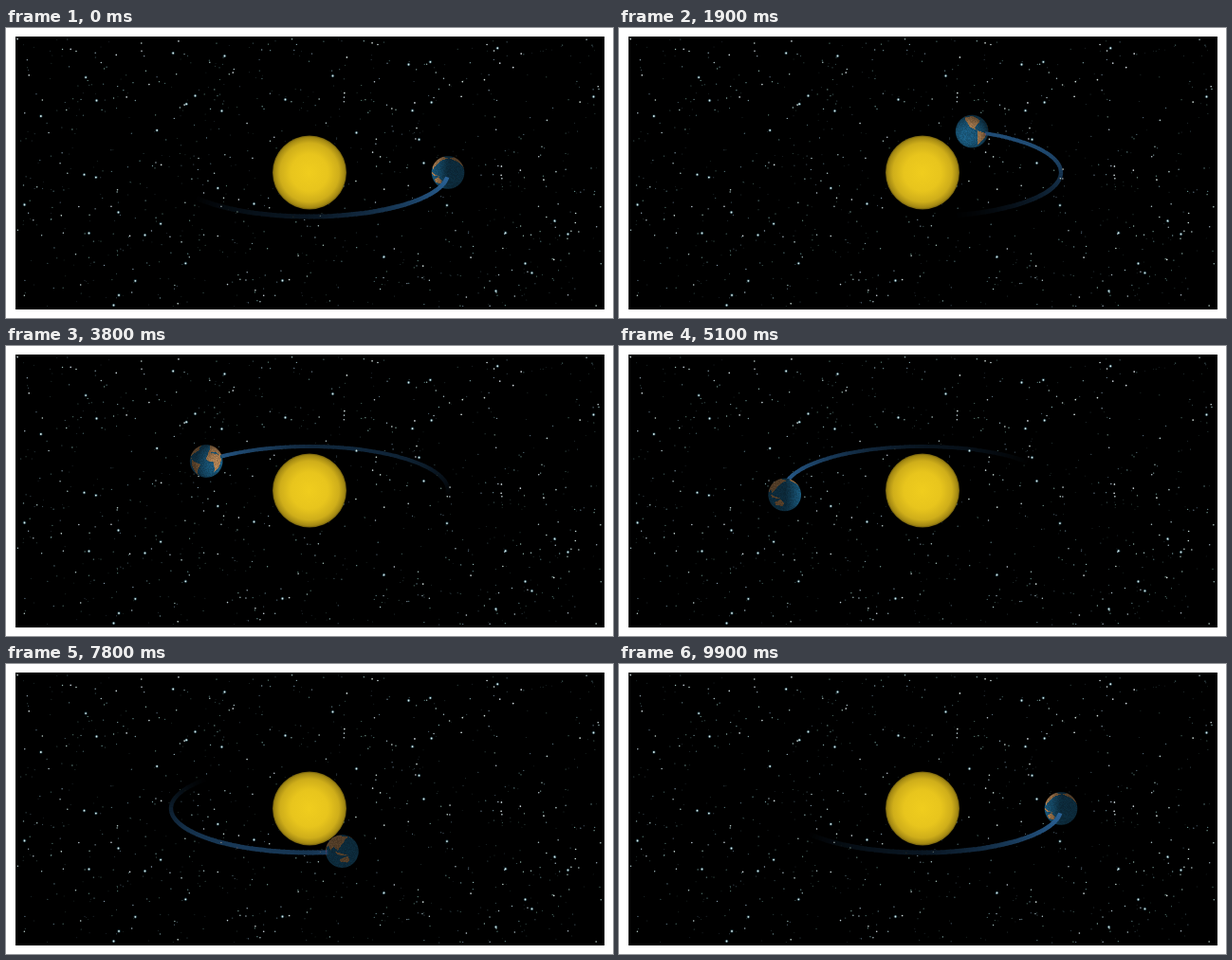
Animation of 640 by 306 pixels, one loop 10 s. Source, as an HTML page with a canvas:

```html
<!DOCTYPE html>
<html lang="en">
<head>
<meta charset="utf-8">
<title>Planet orbiting a star</title>
<style>
html, body { margin: 0; width: 640px; height: 306px; overflow: hidden; background: #fff; }
canvas { display: block; }
</style>
</head>
<body>
<canvas id="stage" width="640" height="306"></canvas>
<script>
const TAU = Math.PI * 2, RAD = Math.PI / 180;
const CX = 320, CY = 152.5, RX = 146, RY = 46.5;
const SUN_R = 39, EARTH_R = 17.3, SIZE = 40;
const STEPS = 99, SPINS = 4, START_LON = 177;
const TILT = Math.asin(RY / RX), VIEW_LAT = 6 * RAD;
const ctx = document.getElementById('stage').getContext('2d');

function layer(w, h) {
  const canvas = document.createElement('canvas');
  canvas.width = w;
  canvas.height = h;
  return canvas.getContext('2d', { willReadFrequently: true });
}

function seeded(seed) {
  return () => (seed = (seed * 16807) % 2147483647) / 2147483647;
}

// The brightest stars; the rest are scattered by a seeded rule
const brightStars = [
  199,71, 369,110, 424,38, 118,194, 227,87, 87,216, 440,142, 547,248,
  516,277, 398,241, 291,266, 113,292, 19,186, 230,29, 619,72, 578,203,
  592,217, 344,50, 95,76, 261,185, 294,75, 146,218
];

function makeSky() {
  const sky = layer(640, 306), rnd = seeded(4217);
  const dot = (x, y, r, color) => {
    sky.fillStyle = color;
    sky.beginPath();
    sky.arc(x, y, r, 0, TAU);
    sky.fill();
  };
  const bright = (x, y) => {
    dot(x, y, 1.8, 'rgba(70,130,150,.4)');
    dot(x, y, 0.9, '#dff4f4');
  };
  sky.fillStyle = '#fff';
  sky.fillRect(0, 0, 640, 306);
  sky.fillStyle = '#000';
  sky.fillRect(10, 9, 621, 288);
  for (let i = 0; i < 950; i++) {
    const x = 12 + rnd() * 616, y = 11 + rnd() * 283, glow = rnd() ** 2.2;
    const hue = 160 + rnd() * 50;
    dot(x, y, 0.45 + glow * 0.4, `hsl(${hue} 18% ${22 + glow * 65}%)`);
  }
  for (let i = 0; i < brightStars.length; i += 2) {
    bright(brightStars[i] + 0.5, brightStars[i + 1] + 0.5);
  }
  for (let i = 0; i < 20; i++) bright(14 + rnd() * 612, 13 + rnd() * 279);
  return sky.canvas;
}

// Land outlines as longitude, latitude pairs
const lands = [
  [-17,15, -6,35, 32,31, 51,11, 35,-22, 20,-35, 9,4, -8,5],
  [-9,37, 8,56, 25,71, 105,77, 178,66, 141,54, 121,30, 106,9, 90,22, 78,8, 57,26, 45,13, 36,37],
  [-166,66, -82,73, -54,47, -81,27, -90,19, -78,8, -105,20, -124,42],
  [-78,8, -35,-6, -57,-36, -68,-54, -81,-5],
  [114,-23, 142,-11, 153,-26, 147,-38, 115,-34],
  [96,5, 148,-9, 106,-6]
];

function makeMap() {
  const map = layer(360, 180);
  map.fillStyle = 'rgb(26,90,126)';
  map.fillRect(0, 0, 360, 180);
  map.fillStyle = 'rgb(176,130,84)';
  for (const land of lands) {
    map.beginPath();
    for (let i = 0; i < land.length; i += 2) map.lineTo(land[i] + 180, 90 - land[i + 1]);
    map.fill();
  }
  const rnd = seeded(91);
  const { data } = map.getImageData(0, 0, 360, 180);
  for (let i = 0; i < data.length; i += 4) {
    const grain = 0.88 + rnd() * 0.24;
    for (let c = 0; c < 3; c++) data[i + c] *= grain;
  }
  return data;
}

const sky = makeSky(), map = makeMap();
const globe = layer(SIZE, SIZE);

function drawEarth(angle, centerLon) {
  const x0 = CX + RX * Math.cos(angle), y0 = CY - RY * Math.sin(angle);
  const left = Math.round(x0 - SIZE / 2), top = Math.round(y0 - SIZE / 2);
  const sun = [-Math.cos(angle), -Math.sin(angle) * Math.sin(TILT), Math.sin(angle) * Math.cos(TILT)];
  const image = globe.createImageData(SIZE, SIZE);
  const sinV = Math.sin(VIEW_LAT), cosV = Math.cos(VIEW_LAT);
  for (let py = 0; py < SIZE; py++) for (let px = 0; px < SIZE; px++) {
    const dx = left + px + 0.5 - x0, dy = y0 - top - py - 0.5, r = Math.hypot(dx, dy);
    if (r > EARTH_R + 0.5) continue;
    const k = 1 / Math.max(EARTH_R, r), x = dx * k, y = dy * k;
    const z = Math.sqrt(Math.max(0, 1 - x * x - y * y));
    const lat = Math.asin(y * cosV + z * sinV) / RAD;
    const lon = centerLon + Math.atan2(x, z * cosV - y * sinV) / RAD;
    const u = ((Math.floor(lon + 180) % 360) + 360) % 360;
    const v = Math.min(179, Math.max(0, Math.floor(90 - lat)));
    const facing = Math.max(0, x * sun[0] + y * sun[1] + z * sun[2]);
    const light = 0.46 + 0.54 * facing;
    const from = (v * 360 + u) * 4, to = (py * SIZE + px) * 4;
    for (let c = 0; c < 3; c++) image.data[to + c] = map[from + c] * light;
    image.data[to + 3] = 255 * Math.min(1, EARTH_R + 0.5 - r);
  }
  globe.putImageData(image, 0, 0);
  ctx.drawImage(globe.canvas, left, top);
}

function drawSun() {
  const fill = ctx.createRadialGradient(CX, CY, 0, CX, CY, SUN_R);
  fill.addColorStop(0, '#f0cd1e');
  fill.addColorStop(0.5, '#e8c51d');
  fill.addColorStop(0.8, '#cfae1a');
  fill.addColorStop(0.95, '#a38813');
  fill.addColorStop(1, '#6e5b0c');
  ctx.fillStyle = fill;
  ctx.beginPath();
  ctx.arc(CX, CY, SUN_R, 0, TAU);
  ctx.fill();
}

function drawTrail(angle) {
  const length = 144, step = 2;
  ctx.globalCompositeOperation = 'lighten';
  for (let d = 6; d < length; d += step) {
    const a = angle - d * RAD;
    const glow = (1 - d / length) * (0.55 + 0.45 * Math.abs(Math.cos(a)));
    ctx.strokeStyle = `rgb(${44 * glow},${104 * glow},${160 * glow})`;
    ctx.lineWidth = 4.3 - 0.5 * Math.sin(a);
    ctx.beginPath();
    ctx.ellipse(CX, CY, RX, RY, 0, -a, -a + (step + 0.4) * RAD);
    ctx.stroke();
  }
  ctx.globalCompositeOperation = 'source-over';
}

function draw(time) {
  const i = Math.floor(time / 100) % 100;
  const angle = TAU * i / STEPS;
  const centerLon = START_LON - 360 * SPINS * i / STEPS;
  const behind = Math.sin(angle) > 0, receding = Math.cos(angle) > 0;
  ctx.drawImage(sky, 0, 0);
  if (!behind) drawSun();
  if (!receding) drawTrail(angle);
  drawEarth(angle, centerLon);
  if (receding) drawTrail(angle);
  if (behind) drawSun();
}

const start = performance.now();
function tick() {
  draw(performance.now() - start);
  requestAnimationFrame(tick);
}
tick();
</script>
</body>
</html>
```
